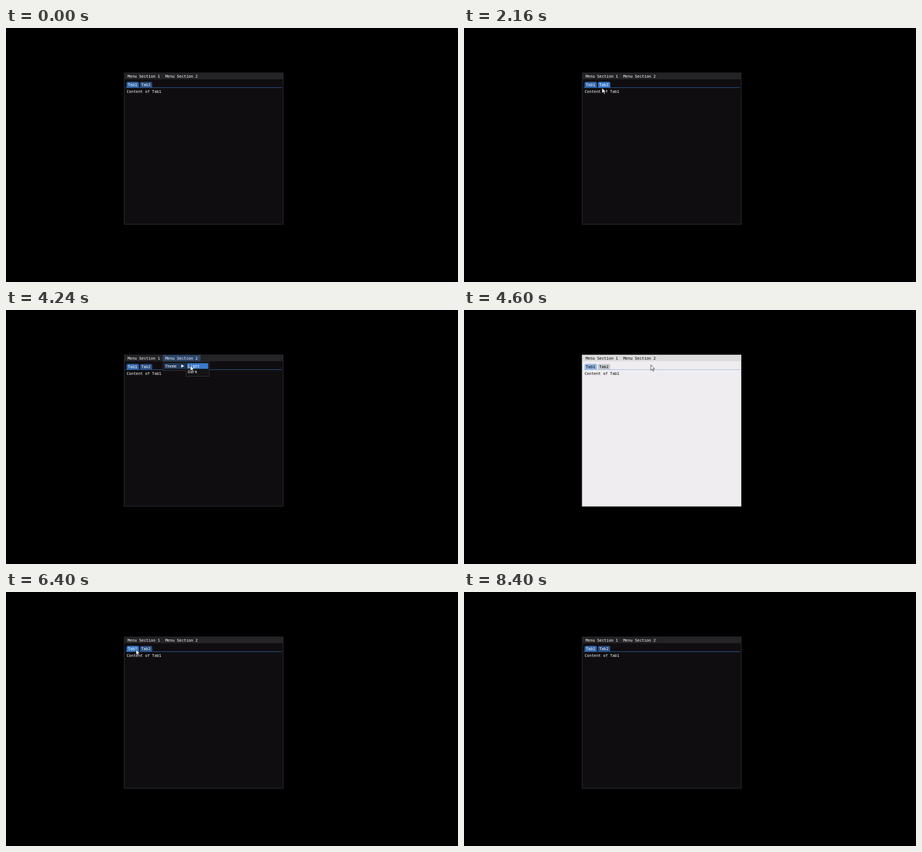
Recreate the animation shown at these times as an HTML page with a canvas. Size 800x450 px, loop 9.16 s.

```html
<!DOCTYPE html>
<html lang="en">
<head>
<meta charset="utf-8">
<title>Menus, tabs and themes</title>
<style>
  html, body { margin: 0; width: 100%; height: 100%; overflow: hidden; background: #000; }
  canvas { display: block; }
</style>
</head>
<body>
<canvas id="stage" width="800" height="450"></canvas>
<script>
const ctx = document.getElementById('stage').getContext('2d');
const LOOP = 9160, STEP = 40;
const SCALE = 800 / 1366; // the interface is laid out on a 1366 x 768 screen

const OPEN = 'rgba(66, 150, 250, .31)', HOVER = 'rgba(66, 150, 250, .8)';
const DARK = {
  window: '#0f0d10', bar: '#242325', popup: '#141414', border: '#3f3d46',
  text: '#fff', tab: '#2a4f82', active: '#3369ad'
};
const LIGHT = {
  window: '#efedf0', bar: '#dbdbdb', popup: '#fff', border: '#a9a8a9',
  text: '#000', tab: '#c8ccd2', active: '#94b8e2'
};

const WINDOW = { x: 356.5, y: 135.5, w: 481.5, h: 459 };
const menuRect = i => ({ x: 360 + 114 * i, y: 136, w: 114, h: 19 });
const tabRect = i => ({ x: 364.5 + 40.5 * i, y: 163, w: 37, h: 18 });
const rowRect = (x, i) => ({ x, y: 161 + 17 * i, w: 64, h: 17 });
const popupRect = (x, rows) => ({ x, y: 155, w: 72, h: 12 + 17 * rows });

const POPUP_X = 474, SUBMENU_X = 543;
const THEME_ROW = rowRect(POPUP_X + 4, 0);

// Where the pointer rests, and when it arrives there
const PLACE = {
  menu1: [412, 147], menu2: [523, 145], theme: [525, 168],
  light: [567.5, 167], dark: [561, 185],
  tab1: [392.5, 173.5], tab2: [416.5, 180.5]
};
const ROUTE = [
  [1080, 'tab2'], [1280, 'menu1'], [2160, 'tab2'], [2760, 'menu1'], [3360, 'menu2'],
  [3840, 'theme'], [4440, 'light'], [5200, 'menu2'], [5480, 'theme'], [5960, 'dark'],
  [6400, 'tab1'], [6800, 'tab2'], [7600, 'tab1']
];
const HIDE_AT = 7880, LONGEST_MOVE = 720;

const during = (t, from, to) => t >= from && t < to;

function pointerAt(t) {
  if (!during(t, ROUTE[0][0], HIDE_AT)) return null;
  const next = ROUTE.findIndex(([arrival]) => arrival > t);
  if (next < 0) return PLACE[ROUTE.at(-1)[1]];
  const [left, from] = ROUTE[next - 1], [arrival, to] = ROUTE[next];
  const duration = Math.min(arrival - left, LONGEST_MOVE);
  const u = Math.max(0, 1 - (arrival - t) / duration);
  const eased = u * u * (3 - 2 * u);
  return PLACE[from].map((v, axis) => v + (PLACE[to][axis] - v) * eased);
}

const hits = (p, { x, y, w, h }) =>
  p !== null && during(p[0], x, x + w) && during(p[1], y, y + h);

function fill({ x, y, w, h }, color) {
  ctx.fillStyle = color;
  ctx.fillRect(x, y, w, h);
}

function panel(rect, color, border) {
  fill(rect, color);
  ctx.strokeStyle = border;
  ctx.lineWidth = 1.2;
  ctx.strokeRect(rect.x + 0.6, rect.y + 0.6, rect.w - 1.2, rect.h - 1.2);
}

function label(text, x, y, color) {
  ctx.fillStyle = color;
  ctx.fillText(text, x, y);
}

function item(rect, text, padding, color, hovered, open) {
  if (hovered || open) fill(rect, hovered ? HOVER : OPEN);
  label(text, rect.x + padding, rect.y + (rect.h + 8) / 2, color);
}

function drawMenus(c, p, open) {
  fill({ x: WINDOW.x + 1, y: 137, w: WINDOW.w - 2, h: 18 }, c.bar);
  for (const i of [0, 1]) {
    const rect = menuRect(i);
    item(rect, 'Menu Section ' + (i + 1), 7.5, c.text, hits(p, rect), open && i === 1);
  }
}

function drawTabs(c, p, selected) {
  for (const i of [0, 1]) {
    const { x, y, w, h } = tabRect(i);
    ctx.fillStyle = hits(p, { x, y, w, h }) ? HOVER : i === selected ? c.active : c.tab;
    ctx.beginPath();
    ctx.roundRect(x, y, w, h, [4, 4, 0, 0]);
    ctx.fill();
    label('Tab' + (i + 1), x + 3.8, 176.5, c.text);
  }
  fill({ x: 361, y: 179.8, w: 473, h: 1.4 }, c.active);
  label('Content of Tab' + (selected + 1), 364.5, 196.5, c.text);
}

function drawPopups(c, p, submenu) {
  panel(popupRect(POPUP_X, 1), c.popup, c.border);
  item(THEME_ROW, 'Theme', 2.5, c.text, hits(p, THEME_ROW), submenu);
  ctx.fill(SUBMENU_ARROW);
  if (!submenu) return;
  panel(popupRect(SUBMENU_X, 2), c.popup, c.border);
  ['Light', 'Dark'].forEach((text, i) => {
    const rect = rowRect(SUBMENU_X + 4, i);
    item(rect, text, 3, c.text, hits(p, rect));
  });
}

const SUBMENU_ARROW = new Path2D('M529.5 165l9 4.5l-9 4.5z');
const POINTER = new Path2D('M.5 .5V17L4.3 13.3L7 19.5L9.5 18.4L6.9 12.4H12Z');

function drawPointer([x, y]) {
  ctx.translate(x, y);
  ctx.fillStyle = '#fff';
  ctx.strokeStyle = '#000';
  ctx.lineWidth = 1.1;
  ctx.fill(POINTER);
  ctx.stroke(POINTER);
}

function draw(t) {
  const c = during(t, 4600, 6000) ? LIGHT : DARK;
  const p = pointerAt(t);
  const open = during(t, 3480, 4600) || during(t, 5200, 6000);
  const submenu = during(t, 3840, 4600) || during(t, 5480, 6000);
  const selected = during(t, 7000, 7600) ? 1 : 0;

  ctx.setTransform(SCALE, 0, 0, SCALE, 0, 0);
  ctx.font = '11.63px "DejaVu Sans Mono", monospace';
  fill({ x: 0, y: 0, w: 1366, h: 769 }, '#000');
  panel(WINDOW, c.window, c.border);
  drawMenus(c, p, open);
  drawTabs(c, open ? null : p, selected);
  if (open) drawPopups(c, p, submenu);
  if (p) drawPointer(p);
}

const start = performance.now();
function tick() {
  const t = (performance.now() - start) % LOOP;
  draw(Math.floor(t / STEP) * STEP);
  requestAnimationFrame(tick);
}
tick();
</script>
</body>
</html>
```
